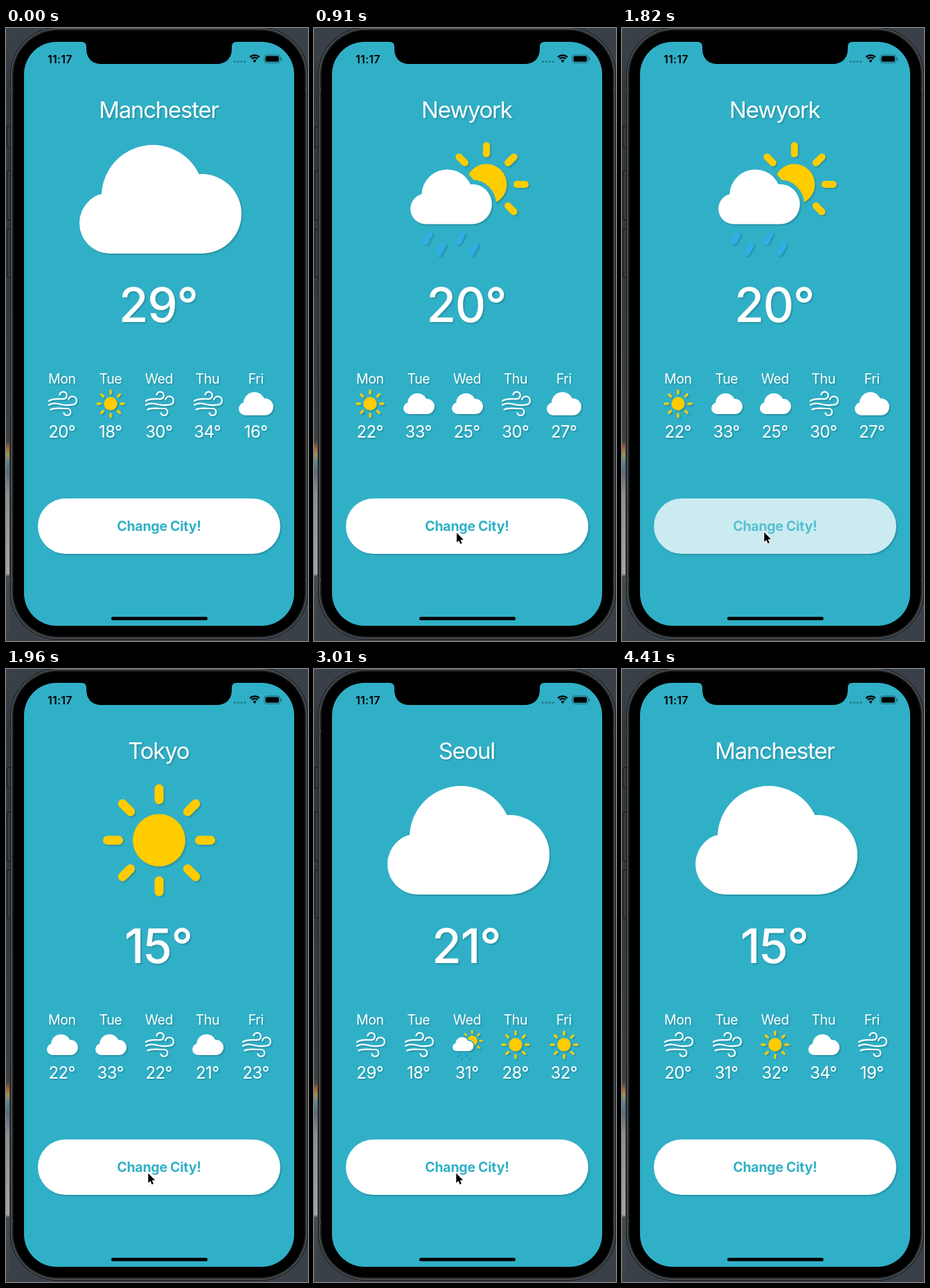
These frames come from a looping animation (436 px wide and 886 px high, 4900 ms). An HTML page with a canvas:

```html
<!DOCTYPE html>
<html lang="en">
<head>
<meta charset="utf-8">
<title>Weather</title>
<style>
  html, body { margin: 0; width: 100%; height: 100%; overflow: hidden; background: #30363c; }
  canvas { display: block; width: 436px; height: 886px; }
</style>
</head>
<body>
<canvas id="stage"></canvas>
<script>
const W = 436, H = 886, LOOP = 4900, STEP = 70;
const TEAL = '#30b0c7', YELLOW = '#ffcc00', RAIN = '#32ade6';
const DAYS = ['Mon', 'Tue', 'Wed', 'Thu', 'Fri'];

const canvas = document.getElementById('stage');
const ctx = canvas.getContext('2d');
const dpr = window.devicePixelRatio || 1;
canvas.width = W * dpr;
canvas.height = H * dpr;

// Each week lists an icon and a temperature per day.
const SCREENS = [
  { from: 0, city: 'Manchester', icon: 'cloud', temp: 29,
    week: 'wind 20 sun 18 wind 30 wind 34 cloud 16' },
  { from: 840, city: 'Newyork', icon: 'rain', temp: 20,
    week: 'sun 22 cloud 33 cloud 25 wind 30 cloud 27' },
  { from: 1890, city: 'Tokyo', icon: 'sun', temp: 15,
    week: 'cloud 22 cloud 33 wind 22 cloud 21 wind 23' },
  { from: 2940, city: 'Seoul', icon: 'cloud', temp: 21,
    week: 'wind 29 wind 18 rain 31 sun 28 sun 32' },
  { from: 4060, city: 'Manchester', icon: 'cloud', temp: 15,
    week: 'wind 20 wind 31 sun 32 cloud 34 wind 19' }
];
const PRESSES = [770, 1820, 2870, 3990];

const cloudPath = new Path2D();
for (const [x, y, r] of [[-11, -4.5, 74], [-73, 34.5, 44], [59.5, 21, 57.5]]) {
  cloudPath.moveTo(x + r, y);
  cloudPath.arc(x, y, r, 0, Math.PI * 2);
}
cloudPath.rect(-73, -7.5, 133, 86);

const windPath = new Path2D(
  'M-19.5 -4C-14 -8 -8 -6.5 1 -6.8A5.2 5.2 0 1 0 -4 -13' +
  'M-19.5 1.8C-13 -2 -7 0 0 1.5S9 2 14.5 1.5A6 6 0 1 0 8.6 -6' +
  'M-17 8.5C-11 5.5 -6 7 7 7A5 5 0 1 1 2 13.5');

const cursorPath = new Path2D('M0 0V14L3.2 11.2L5.3 16.2L7.6 15.2L5.5 10.3H9.8Z');

function shadow(on) {
  ctx.shadowColor = on ? 'rgba(0,0,0,.16)' : 'transparent';
  ctx.shadowBlur = 2 * dpr;
  ctx.shadowOffsetX = ctx.shadowOffsetY = 2 * dpr;
}

function at(x, y, scale, draw) {
  ctx.save();
  ctx.translate(x, y);
  ctx.scale(scale, scale);
  draw();
  ctx.restore();
}

function box(x, y, w, h, r, color) {
  ctx.beginPath();
  ctx.roundRect(x, y, w, h, r);
  ctx.fillStyle = color;
  ctx.fill();
}

function disc(x, y, r, color) {
  ctx.beginPath();
  ctx.arc(x, y, r, 0, Math.PI * 2);
  ctx.fillStyle = color;
  ctx.fill();
}

function line(x1, y1, x2, y2, width, color) {
  ctx.beginPath();
  ctx.moveTo(x1, y1);
  ctx.lineTo(x2, y2);
  ctx.lineWidth = width;
  ctx.lineCap = 'round';
  ctx.strokeStyle = color;
  ctx.stroke();
}

function text(str, x, y, size, weight, color, spacing = 0) {
  ctx.font = `${weight} ${size}px Inter, "Liberation Sans", sans-serif`;
  ctx.letterSpacing = spacing + 'px';
  ctx.textAlign = 'center';
  ctx.fillStyle = color;
  ctx.fillText(str, x + spacing / 2, y);
}

function rays(first, count, r1, r2, width) {
  for (let i = first; i < first + count; i++) {
    const c = Math.cos(i * Math.PI / 4), s = Math.sin(i * Math.PI / 4);
    line(c * r1, s * r1, c * r2, s * r2, width, YELLOW);
  }
}

const ICONS = {
  cloud() {
    ctx.fillStyle = '#fff';
    ctx.fill(cloudPath);
  },
  sun() {
    disc(0, 0, 38, YELLOW);
    rays(0, 8, 58.5, 74.5, 13);
  },
  rain() {
    at(24.5, -21.5, 1, () => {
      disc(0, 0, 29.5, YELLOW);
      rays(-3, 5, 44, 56, 10);
    });
    at(-26.5, -3.5, 0.503, () => {
      ctx.save();
      shadow(false);
      ctx.lineWidth = 25;
      ctx.strokeStyle = TEAL;
      ctx.stroke(cloudPath);
      ctx.restore();
      ICONS.cloud();
    });
    for (const [x, y] of [[-60, 56], [-41, 72], [-13, 56], [6, 72]]) {
      line(x + 3, y - 5.5, x - 3, y + 5.5, 8, RAIN);
    }
  },
  wind() {
    ctx.lineWidth = 2.2;
    ctx.lineCap = 'round';
    ctx.strokeStyle = '#fff';
    ctx.stroke(windPath);
  }
};

function smallIcon(name, i) {
  const wide = i === 4;
  const scale = { cloud: wide ? 0.213 : 0.192, sun: 0.254, rain: 0.257, wind: 1 }[name];
  const dx = { cloud: wide ? 0 : 0.5, sun: 0, rain: 1, wind: 0.5 }[name];
  at(81 + 70 * i + dx, 543, scale, ICONS[name]);
}

function drawDesk() {
  const g = ctx.createLinearGradient(0, 0, 0, H);
  const stops = [[0, '#3c444b'], [.1, '#30363c'], [.5, '#343a40'], [.66, '#3b4045'],
    [.675, '#4b4540'], [.685, '#a5633a'], [.695, '#98945a'], [.71, '#568290'],
    [.725, '#626b76'], [.76, '#8b8f92'], [.89, '#a2a5a7'], [.895, '#454c51'], [1, '#3b4248']];
  for (const [p, c] of stops) g.addColorStop(p, c);
  ctx.fillStyle = '#394047';
  ctx.fillRect(0, 0, W, H);
  ctx.fillStyle = g;
  ctx.fillRect(0, 0, 5, H);
}

function drawPhone() {
  for (const [y, h] of [[142, 31], [206, 72], [290, 71]]) {
    box(1, y, 8, h, 2, '#15181a');
    box(2, y + 1, 6, h - 2, 1.5, '#363b3f');
  }
  box(6, -1, 430, 885, 69, '#111315');
  box(7, 0, 428, 883, 68, '#54595c');
  box(8.5, 1.5, 425, 880, 66.5, '#24282a');
  ctx.fillStyle = '#3b4043';
  for (const y of [87, 796]) {
    ctx.fillRect(6.5, y, 4, 5);
    ctx.fillRect(431.5, y, 4, 5);
  }
  box(10.5, 3.5, 421, 876, 64.5, '#000');
  box(26, 20, 390, 844, 47, TEAL);

  ctx.fillStyle = '#000';
  ctx.fill(new Path2D('M109 19V20Q116 20 116 27V29C116 44 124 52 139 52' +
    'H303C318 52 326 44 326 29V27Q326 20 333 20V19Z'));
}

function drawStatus() {
  text('11:17', 77.7, 50.5, 16, 600, '#000', 0.2);
  for (let i = 0; i < 4; i++) disc(330.3 + i * 4.9, 48.7, 1.6, '#23808f');

  ctx.save();
  ctx.strokeStyle = '#000';
  ctx.lineCap = 'butt';
  ctx.lineWidth = 2.2;
  for (const r of [6.2, 9.7]) {
    ctx.beginPath();
    ctx.arc(359, 49, r, -Math.PI * .75, -Math.PI * .25);
    ctx.stroke();
  }
  ctx.fillStyle = '#000';
  ctx.beginPath();
  ctx.moveTo(359, 50.2);
  ctx.arc(359, 49.5, 3.5, -Math.PI * .75, -Math.PI * .25);
  ctx.fill();

  ctx.beginPath();
  ctx.roundRect(372.8, 38.9, 23, 11.6, 3.6);
  ctx.lineWidth = 1;
  ctx.strokeStyle = 'rgba(0,0,0,.4)';
  ctx.stroke();
  ctx.restore();
  box(374.6, 40.6, 19.4, 8.2, 2.2, '#000');
  box(396.8, 42.8, 1.4, 4, 1, 'rgba(0,0,0,.45)');
  box(152, 851, 139, 5, 2.5, '#000');
}

function drawForecast(screen) {
  shadow(true);
  text(screen.city, 221, 129.5, 33, 400, '#fff', -1.25);
  const x = { cloud: 223, sun: 221, rain: 224.5 }[screen.icon];
  at(x, 247.5, 1, ICONS[screen.icon]);
  text(screen.temp + '°', 220.5, 425, 69, 500, '#fff', -1.2);

  const week = screen.week.split(' ');
  DAYS.forEach((day, i) => {
    const x = 81 + 70 * i;
    text(day, x, 513.5, 19.5, 400, '#fff', -0.4);
    smallIcon(week[2 * i], i);
    text(week[2 * i + 1] + '°', x, 591.5, 24, 400, '#fff', -0.6);
  });
  shadow(false);
}

function drawButton(alpha) {
  shadow(true);
  box(46, 680, 350, 80, 40, TEAL);
  shadow(false);
  ctx.save();
  ctx.globalAlpha = alpha;
  box(46, 680, 350, 80, 40, '#fff');
  text('Change City!', 221, 727, 19.5, 700, TEAL, -0.25);
  ctx.restore();
}

function buttonAlpha(t) {
  for (const p of PRESSES) {
    if (t >= p && t < p + 70) return 0.75;
    if (t >= p + 70 && t < p + 140) return 0.84;
  }
  return 1;
}

const mix = (a, b, k) => a + (b - a) * k;

function cursorPos(t) {
  if (t < 70 || t >= 4410) return null;
  if (t < 490) {
    const k = 1 - (1 - (t - 70) / 420) ** 2;
    return [mix(283, 206, k), mix(868, 729.5, k)];
  }
  if (t < 1400) return [206, 729.5];
  if (t < 4130) return [205.3, 728.8];
  const k = ((t - 4130) / 210) ** 2;
  return [mix(205.3, 216, k), mix(728.8, 866, k)];
}

function drawCursor(t) {
  const pos = cursorPos(t);
  if (!pos) return;
  if (t >= 700 && t < 840) {
    ctx.beginPath();
    ctx.arc(205, 729, 21.5, 0, Math.PI * 2);
    ctx.lineWidth = 1.5;
    ctx.strokeStyle = '#000';
    ctx.stroke();
  }
  at(pos[0], pos[1], 1, () => {
    ctx.lineJoin = 'round';
    ctx.lineWidth = 2;
    ctx.strokeStyle = '#fff';
    ctx.stroke(cursorPath);
    ctx.fillStyle = '#000';
    ctx.fill(cursorPath);
  });
}

function render(t) {
  ctx.setTransform(dpr, 0, 0, dpr, 0, 0);
  shadow(false);
  drawDesk();
  drawPhone();
  drawStatus();
  drawForecast(SCREENS.findLast(s => t >= s.from));
  drawButton(buttonAlpha(t));
  drawCursor(t);
}

const start = performance.now();
function tick() {
  const t = (performance.now() - start) % LOOP;
  render(Math.floor(t / STEP) * STEP);
  requestAnimationFrame(tick);
}
tick();
</script>
</body>
</html>
```
